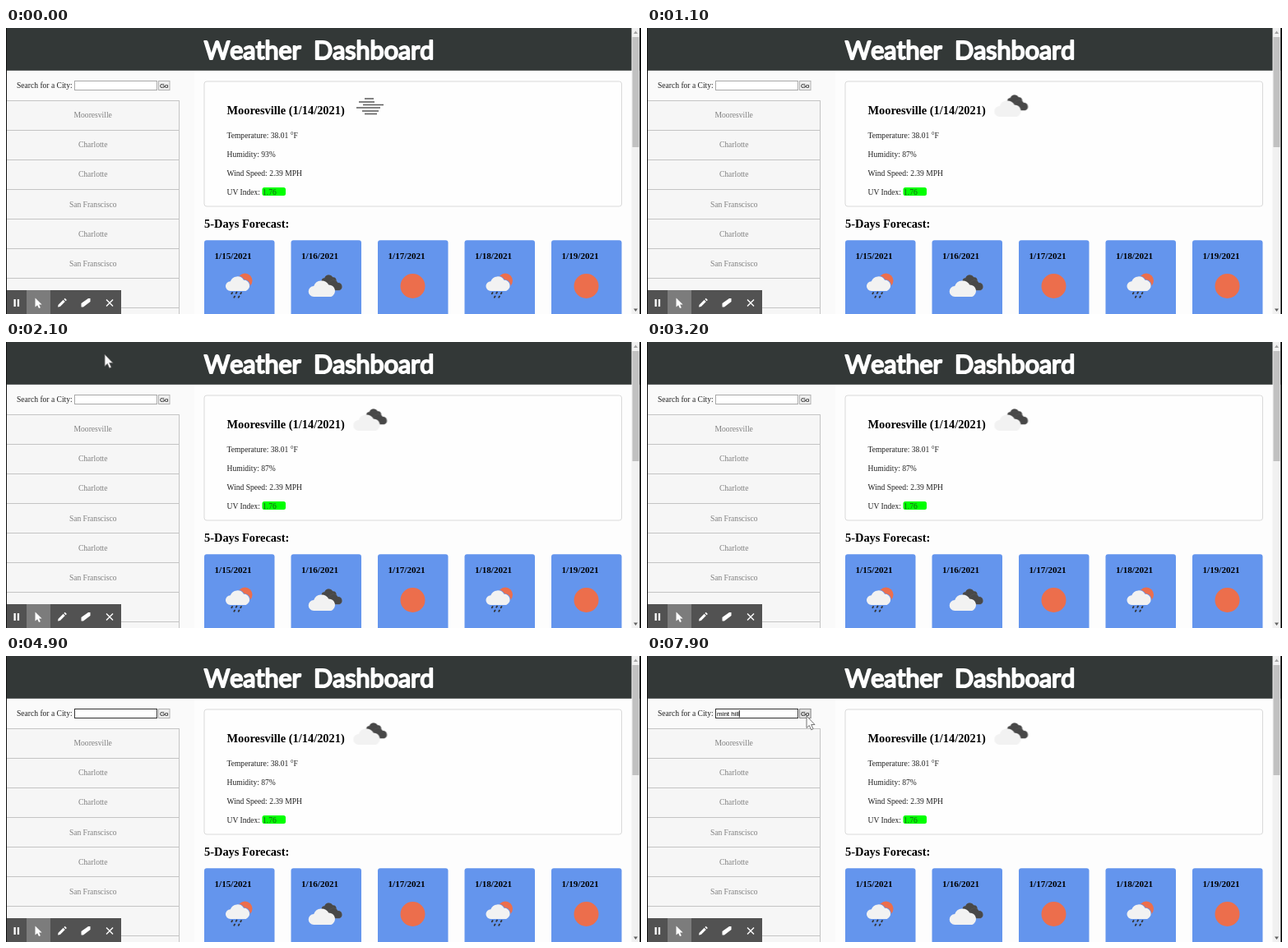
Animation, 772 px wide and 348 px high, one loop 8000 ms. Source, as an HTML page:

```html
<!DOCTYPE html>
<html lang="en">
<head>
<meta charset="utf-8">
<title>Weather Dashboard</title>
<style>
  html, body { margin: 0; width: 100%; height: 100%; overflow: hidden; background: #fdfdfd; }
  svg { display: block; }
  text { font: 9.57px "Liberation Serif", "Times New Roman", serif; fill: #222; white-space: pre; }
  .title { font: 30.5px Lato, sans-serif; font-kerning: none; word-spacing: 7.5px; fill: #fff; stroke: #fff;
           stroke-width: 2; stroke-linejoin: round; text-anchor: middle; }
  .head { font-size: 14.4px; font-weight: bold; fill: #000; }
  .date { font-size: 11.15px; font-weight: bold; fill: #000; }
  .city { fill: #808080; text-anchor: middle; }
  .ui { font: 7.96px "Liberation Sans", Arial, sans-serif; fill: #000; }
  .rule { stroke: #c4c4c4; }
  .light { fill: #f2f2f2; }
  .dark { fill: #484848; stroke: #777; paint-order: stroke; }

  .page, .loading, .before, .after, .focus, .hover, .pointer { animation: 8s step-end infinite; }
  .page { animation-name: page; }
  .loading { animation-name: loading; }
  .before { animation-name: before; }
  .after { animation-name: after; }
  .focus { animation-name: focus; }
  .hover { animation-name: hover; }
  .pointer { animation-name: pointer; }
  .path { animation: path 8s ease-in-out infinite; }

  @keyframes page { 0%, 13.75% { opacity: 1 } 10% { opacity: 0 } }
  @keyframes loading { 0%, 13.75% { opacity: 0 } 10% { opacity: 1 } }
  @keyframes before { 0% { opacity: 1 } 10%, 100% { opacity: 0 } }
  @keyframes after { 0% { opacity: 0 } 13.75%, 100% { opacity: 1 } }
  @keyframes focus { 0% { opacity: 0 } 42.5%, 100% { opacity: 1 } }
  @keyframes hover { 0% { opacity: 0 } 93.75%, 100% { opacity: 1 } }
  @keyframes pointer { 0%, 38.75% { opacity: 0 } 25%, 91.25%, 100% { opacity: 1 } }
  @keyframes path {
    0%, 26.25% { transform: translate(120px, 15px) }
    38.75% { transform: translate(134px, 66px) }
    91.25% { transform: translate(184px, 66px) }
    95%, 100% { transform: translate(194px, 73px) }
  }
</style>
</head>
<body>
<svg width="772" height="348" viewBox="0 0 772 348">
  <defs>
    <path id="cloud" d="M7 26a6.5 6.5 0 0 1 0-13a10 10 0 0 1 18-1.5a7.5 7.5 0 0 1 3 14.5z"/>
    <g id="clouds">
      <use class="dark" href="#cloud" transform="translate(15.5 -4) scale(.55)"/>
      <use class="dark" href="#cloud" transform="translate(20 2) scale(.62)"/>
      <use class="light" href="#cloud" x="-.8"/>
    </g>
    <circle id="sun" cx="21" cy="13" r="15" fill="#ec6e4c"/>
    <g id="rain">
      <circle cx="28" cy="6.5" r="9" fill="#ec6e4c"/>
      <use class="light" href="#cloud" transform="translate(4 -4.5) scale(.9)"
        stroke="#6495ed" stroke-width="2" paint-order="stroke"/>
      <path stroke="#333" stroke-width="1.8" stroke-linecap="round"
        d="M12.600 21l-.8 1.300M18 20.500l-.8 1.300M23.500 21l-.8 1.300M15.600 25.500l-.8 1.300M21 25.500l-.8 1.300"/>
    </g>
  </defs>

  <rect width="772" height="348" fill="#fdfdfd"/>
  <rect width="772" height="51.800" fill="#333837"/>

  <g class="loading">
    <text class="title" x="385.5" y="38.2">Weather Dashboard</text>
    <path d="M244 65h514" stroke="#bdbdbd"/>
  </g>

  <g class="page">
    <text class="title" x="380.5" y="38.2">Weather Dashboard</text>
    <rect y="52" width="229" height="296" fill="#fafafa"/>
    <g id="cities"><rect x="1" y="88" width="210" height="260" fill="#f6f6f6"/><path class="rule" d="M210.5 88V348"/></g>

    <rect x="241" y="65" width="507.5" height="152" rx="3" fill="#fefefe" stroke="#d9d9d9"/>
    <text class="head" x="268.5" y="105">Mooresville (1/14/2021)</text>
    <path class="before" stroke="#5a5a5a" stroke-width="1.7"
      d="M436 86h11M429 90h19M434 93.5h25M426 97h29M433 101h20M436 104.5h15"/>
    <use class="after" href="#clouds" x="422.5" y="82"/>
    <text x="268.5" y="134">Temperature: 38.01 °F</text>
    <text class="before" x="268.5" y="157">Humidity: 93%</text>
    <text class="after" x="268.5" y="157">Humidity: 87%</text>
    <text x="268.5" y="179.5">Wind Speed: 2.39 MPH</text>
    <text x="268.5" y="202.5">UV Index:</text>
    <rect x="311.5" y="194" width="28.5" height="10" rx="2.5" fill="#0f0"/>
    <text x="312" y="202.5" fill-opacity=".75">1.76</text>

    <text class="head" x="241" y="242.5">5-Days Forecast:</text>
    <g id="days"></g>

    <rect x="760.5" width="10" height="348" fill="#f1f1f1"/>
    <rect x="761.5" y="11" width="8" height="134" fill="#c1c1c1"/>
    <path d="M763 7h5l-2.500-3.500z" fill="#a3a3a3"/>
    <path d="M763 341.500h5l-2.500 3.500z" fill="#606060"/>
  </g>

  <text x="13" y="73">Search for a City:</text>
  <rect x="83.5" y="64.5" width="100" height="11" fill="#fff" stroke="#a8a8a8"/>
  <rect class="focus" x="83.5" y="64.5" width="100" height="11" fill="#fff" stroke="#333"/>
  <text class="ui" id="typed" x="85" y="72.8"></text>
  <path id="caret" d="M0 66v8.5" stroke="#000" stroke-width=".9"/>
  <rect x="185.5" y="64.5" width="13.5" height="11" fill="#efefef" stroke="#b0b0b0"/>
  <rect class="hover" x="185.5" y="64.5" width="13.5" height="11" fill="#e2e2e2" stroke="#8c8c8c"/>
  <text class="ui" x="192.2" y="72.8" text-anchor="middle">Go</text>

  <g fill="#fff">
    <rect y="319" width="140" height="29" fill="#525252"/>
    <rect x="25" y="319" width="29" height="29" fill="#7c7c7c"/>
    <path d="M9.5 330h2.3v9h-2.3zM13.8 330h2.3v9h-2.3z"/>
    <path d="M35.5 328.5v11l2.6-2.3 1.9 3.9 1.9-.9-1.8-3.8h3.5z"/>
    <path d="M63 339.5l.6-2.8 6-6 2.2 2.2-6 6zM70.4 330l1.3-1.3 2.2 2.2-1.3 1.3z"/>
    <path d="M91.5 335l8.5-6h2.5v4l-8.5 6.5h-2.5z"/>
    <path d="M122 330.5l8 8m0-8l-8 8" stroke="#fff" stroke-width="1.4"/>
  </g>

  <path d="M.5 0V348" stroke="#111"/>
  <path d="M771.200 0V348" stroke="#000" stroke-width="1.600"/>

  <g class="path"><path class="pointer" fill="#fbfbfb" stroke="#666" stroke-width=".9"
    d="M0 0v14.5l3.3-3 2.4 5.3 2.4-1.1-2.4-5.2h4.3z"/></g>
</svg>
<script>
  const $ = id => document.getElementById(id);
  const add = (id, markup) => $(id).insertAdjacentHTML('beforeend', markup);

  const cities = ['Mooresville', 'Charlotte', 'Charlotte', 'San Franscisco', 'Charlotte', 'San Franscisco', '', ''];
  cities.forEach((name, i) => {
    const y = 88 + i * 36.1;
    add('cities', `<path class="rule" d="M1 ${Math.floor(y) + .5}H211"/><text class="city" x="105.7" y="${y + 21.2}">${name}</text>`);
  });

  ['rain', 'clouds', 'sun', 'rain', 'sun'].forEach((sky, i) => {
    const x = 241 + i * 105.5;
    add('days', `<rect x="${x}" y="258.2" width="85.5" height="100" rx="3" fill="#6495ed"/>
      <text class="date" x="${x + 12.5}" y="281">1/${15 + i}/2021</text>
      <use href="#${sky}" x="${x + 21.5}" y="301"/>`);
  });

  const LOOP = 8000, FOCUS = 3400, BLINK = 500;
  const query = 'mint hill';
  const keyTimes = [5400, 5500, 5600, 5800, 5900, 6000, 6300, 6400, 6500];
  const start = performance.now();

  function draw() {
    const t = (performance.now() - start) % LOOP;
    const count = keyTimes.filter(k => k <= t).length;
    const last = count ? keyTimes[count - 1] : FOCUS;
    const on = t >= FOCUS && Math.floor((t - last) / BLINK) % 2 === 0;
    const typed = $('typed');
    typed.textContent = query.slice(0, count);
    const x = 85.3 + (count ? typed.getComputedTextLength() : 0);
    $('caret').setAttribute('transform', `translate(${x} 0)`);
    $('caret').setAttribute('opacity', on ? 1 : 0);
    requestAnimationFrame(draw);
  }
  draw();
</script>
</body>
</html>
```
